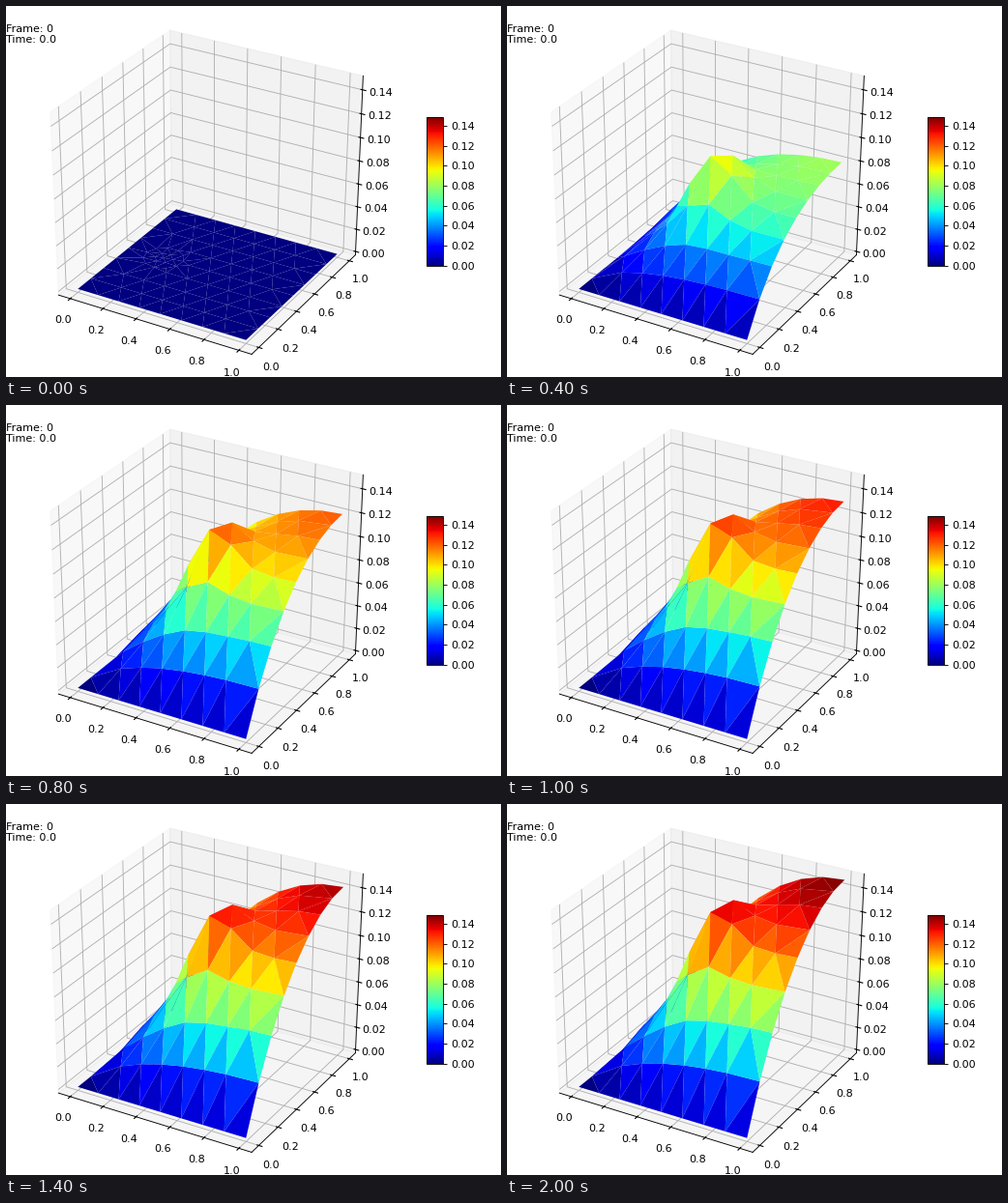
A matplotlib script for the animation above (2100 ms loop, 512x384 px).

```python
import numpy as np
import matplotlib.pyplot as plt
from matplotlib.animation import FuncAnimation
from matplotlib.cm import ScalarMappable
from matplotlib.collections import LineCollection, PolyCollection
from matplotlib.colors import Normalize
from matplotlib.patches import Polygon
from matplotlib.tri import Triangulation

W, H, DPI = 512, 384, 80
FRAMES, STEP_MS = 21, 100
ZMAX = 0.1484
DT = 0.05
EDGE = 0.5 + 1 / 48      # half width of the padded unit cube
DELTA = 1 / 12

plt.rcParams.update({"font.family": "DejaVu Sans", "font.size": 10})

# Camera: elevation 30, azimuth -60, distance 10
el, az = np.radians(30), np.radians(-60)
RIGHT = np.array([-np.sin(az), np.cos(az), 0])
UP = np.array([-np.sin(el) * np.cos(az), -np.sin(el) * np.sin(az), np.cos(el)])
EYE = np.array([np.cos(el) * np.cos(az), np.cos(el) * np.sin(az), np.sin(el)])


def project(p):
    """Centred cube coordinates to stage pixels (y up)."""
    p = np.asarray(p, float)
    depth = 10 - p @ EYE
    sx = (p @ RIGHT / depth + 0.095) / 0.185 * 0.8 * W
    sy = (p @ UP / depth + 0.095) / 0.185 * H
    return np.stack([sx, sy], axis=-1)


def to_cube(x, y, z):
    return np.stack([(x + 0.05) / 1.1 - 0.5,
                     (y + 0.05) / 1.1 - 0.5,
                     z / ZMAX - 0.5], axis=-1)


def make_mesh():
    focus = np.array([0.22, 0.5])
    pts = []
    for j in range(9):
        row = np.arange(9) / 8
        if j % 2:
            row = np.r_[0, np.arange(1.5, 7) / 8, 1]
        for x in row:
            p = np.array([x, j / 8])
            if x == 0 or np.hypot(*(p - focus)) > 0.15:
                pts.append(p)
    pts.append(focus)
    for r, n in ((0.05, 6), (0.11, 11)):
        a = 2 * np.pi * np.arange(n) / n + 0.2
        pts.extend(focus + r * np.c_[np.cos(a), np.sin(a)])
    x, y = np.array(pts).T
    return x, y, Triangulation(x, y).triangles


X, Y, TRI = make_mesh()

# Heated plate, cold along x=0 and y=0, as a sine series
m = np.arange(1, 40, 2)
SX = np.sin(np.outer(X, m) * np.pi / 2)
SY = np.sin(np.outer(Y, m) * np.pi / 2)
LAM = 0.978 * np.pi ** 2 / 4 * (m[:, None] ** 2 + m ** 2)
COEF = 8 / (np.pi ** 2 * np.outer(m, m)) / LAM
BUMP = 0.046 * np.exp(-((X - 0.5) ** 2 + (Y - 0.53) ** 2) / 0.031)
DIP = 0.010 * X / 0.22 * np.exp(-((X - 0.22) ** 2 + (Y - 0.55) ** 2) / 0.03)


def heat(n):
    grow = COEF * (1 - (1 + DT * LAM) ** -float(n))
    plate = np.einsum("im,mk,ik->i", SX, grow, SY)
    return plate + BUMP * (1 - 0.35 ** n) - DIP * (1 - 0.8 ** n)


fig = plt.figure(figsize=(W / DPI, H / DPI), dpi=DPI, facecolor="white")
ax = fig.add_axes([0, 0, 1, 1])
ax.set(xlim=(0, W), ylim=(0, H))
ax.axis("off")


def add_pane(corners, grey):
    ax.add_patch(Polygon(project(corners), closed=True, facecolor=str(grey),
                         edgecolor=str(grey), alpha=0.5, lw=1, zorder=1))


E = EDGE
add_pane([(-E, -E, -E), (-E, E, -E), (-E, E, E), (-E, -E, E)], 0.95)
add_pane([(-E, E, -E), (E, E, -E), (E, E, E), (-E, E, E)], 0.90)
add_pane([(-E, -E, -E), (E, -E, -E), (E, E, -E), (-E, E, -E)], 0.925)


def add_axis(index, edge, tick_dir, outward, ticks, fmt):
    """One axis line with its grid, ticks and labels."""
    back = np.array([-E, E, -E])
    others = [i for i in range(3) if i != index]
    line = np.tile(np.array(edge, float), (2, 1))
    line[:, index] = -E, E
    ax.plot(*project(line).T, color="k", lw=0.8, zorder=3)
    grid = []
    for value, pos in ticks:
        path = np.tile(back, (3, 1))
        path[:, index] = pos
        path[0, others[0]] *= -1
        path[2, others[1]] *= -1
        grid.append(project(path))

        mark = np.tile(np.array(edge, float), (2, 1))
        mark[:, index] = pos
        mark[:, tick_dir] += outward * DELTA * np.array([-0.1, 0.2])
        ax.plot(*project(mark).T, color="k", lw=1, zorder=3)

        spot = np.array(edge, float)
        spot += np.sign(spot) * 0.7728 * DELTA
        spot[index] = pos
        ax.text(*project(spot), fmt % value, ha="center", va="top", zorder=5)
    ax.add_collection(LineCollection(grid, colors="#b0b0b0", linewidths=0.8,
                                     zorder=2))


flat = [(v, (v + 0.05) / 1.1 - 0.5) for v in np.arange(6) / 5]
tall = [(v, v / ZMAX - 0.5) for v in np.arange(8) / 50]
add_axis(0, (0, -E, -E), 1, -1, flat, "%.1f")
add_axis(1, (E, 0, -E), 0, 1, flat, "%.1f")
add_axis(2, (E, E, 0), 0, 1, tall, "%.2f")

ax.text(0, 0.93 * H, "Frame: 0", zorder=5)
ax.text(0, 0.90 * H, "Time: 0.0", zorder=5)

norm = Normalize(0, ZMAX)
cmap = plt.get_cmap("jet")
cax = fig.add_axes([0.85, 0.3, 0.4 * H / 9 / W, 0.4])
fig.colorbar(ScalarMappable(norm, cmap), cax=cax,
             ticks=np.arange(8) / 50, format="%.2f")

surface = PolyCollection([], edgecolors="none", antialiased=True, zorder=4)
ax.add_collection(surface, autolim=False)


def draw(n):
    z = heat(n)
    pts = to_cube(X, Y, z)
    order = np.argsort((pts @ EYE)[TRI].mean(axis=1), kind="stable")
    tri = TRI[order]
    surface.set_verts(project(pts)[tri])
    surface.set_facecolor(cmap(norm(z[tri].mean(axis=1))))
    return (surface,)


anim = FuncAnimation(fig, draw, frames=FRAMES, interval=STEP_MS,
                     repeat=True, repeat_delay=0, blit=False)
plt.show()
```
